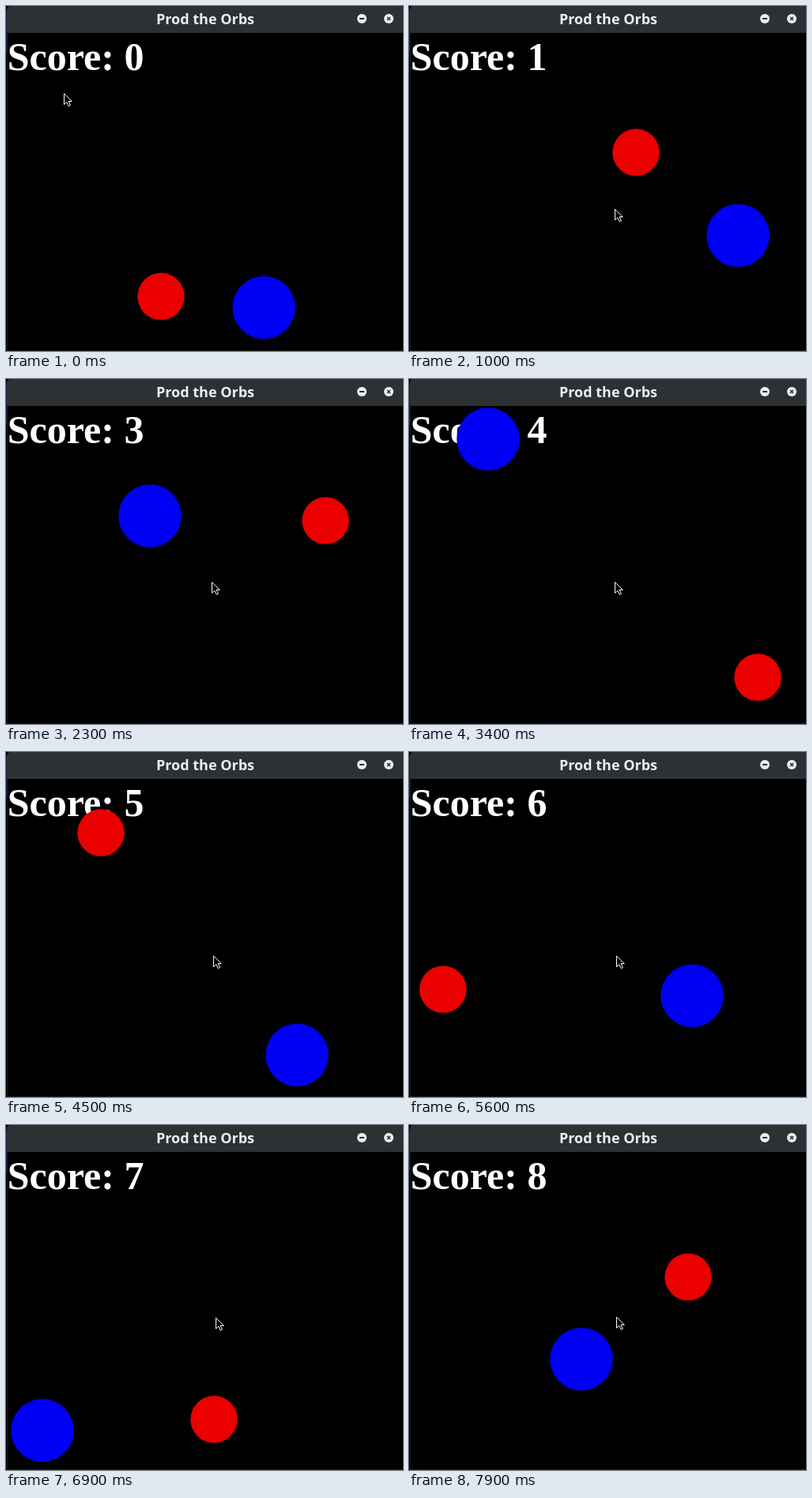
Write an HTML page with a canvas that moves like this. It is 502 px wide and 436 px high and loops after 8 s.

```html
<!DOCTYPE html>
<html lang="en">
<head>
<meta charset="utf-8">
<title>Dots game</title>
<style>
html, body { margin: 0; width: 100%; height: 100%; overflow: hidden; background: #000; }
canvas { display: block; }
</style>
</head>
<body>
<canvas id="stage" width="502" height="436"></canvas>
<script>
const ctx = document.getElementById('stage').getContext('2d');
const LOOP = 8000;
const FIELD = { left: 2, right: 502, top: 35, bottom: 435 };

// Each round holds dot positions and velocities at time `at`; a click starts the next round.
const rounds = [
  { from: 0, at: 0, red: [196, 367, 1, -2], blue: [326, 381, 2, -1] },
  { from: 4000, at: 5600, red: [43, 300, 1, 2], blue: [358, 308, -2, -1] },
  { from: 6850, at: 6900, red: [263, 372, 1, -2], blue: [46, 386, -2, -1] }
];

// time, x, y of the pointer tip
const pointerPath = [
  [50, 73, 110], [850, 260, 256], [3950, 260, 256], [4000, 262, 257],
  [6500, 262, 257], [6800, 265, 243], [7250, 265, 243], [7400, 262, 242]
];

const steps = t => Math.floor(t * 0.0901 + 0.9);

function bounce(p, low, high) {
  const span = high - low, period = 2 * span;
  const m = ((p - low) % period + period) % period;
  return low + (m > span ? period - m : m);
}

function disc(x, y, r, color) {
  ctx.fillStyle = color;
  ctx.beginPath();
  ctx.arc(x, y, r, 0, 2 * Math.PI);
  ctx.fill();
}

function line(x1, y1, x2, y2) {
  ctx.beginPath();
  ctx.moveTo(x1, y1);
  ctx.lineTo(x2, y2);
  ctx.stroke();
}

function drawDot([x, y, vx, vy], n, r, color) {
  disc(bounce(x + vx * n, FIELD.left + r, FIELD.right - r),
       bounce(y + vy * n, FIELD.top + r, FIELD.bottom - r), r - 0.3, color);
}

function drawWindow() {
  ctx.fillStyle = '#000';
  ctx.fillRect(0, 0, 502, 436);
  ctx.fillStyle = '#2d3134';
  ctx.beginPath();
  ctx.roundRect(1, 0, 501, 34, [5, 0, 0, 0]);
  ctx.fill();
  ctx.fillStyle = '#1c1c1e';
  ctx.fillRect(1, 34, 1, 402);
  ctx.fillRect(1, 435, 501, 1);
  ctx.fillStyle = '#181e4a';
  ctx.fillRect(0, 6, 1, 52);

  ctx.fillStyle = '#eee';
  ctx.font = 'bold 18px "Noto Sans", "Open Sans", sans-serif';
  ctx.textAlign = 'center';
  ctx.fillText('Prod the Orbs', 252, 23);

  disc(450, 16, 6, '#eee');
  disc(484, 16, 6, '#eee');
  ctx.strokeStyle = '#2d3134';
  ctx.lineWidth = 2;
  line(447, 16, 453, 16);
  ctx.lineWidth = 1.6;
  line(482, 14, 486, 18);
  line(486, 14, 482, 18);
}

function drawScore(t) {
  ctx.fillStyle = '#fff';
  ctx.font = 'bold 50px "Liberation Serif", "Times New Roman", serif';
  ctx.textAlign = 'left';
  ctx.fillText('Score: ' + Math.floor((t + 850) / 1000), 1.8, 80.5);
}

function pointerAt(t) {
  const i = pointerPath.findIndex(k => k[0] > t);
  if (i === 0) return pointerPath[0].slice(1);
  if (i < 0) return pointerPath.at(-1).slice(1);
  const [t0, x0, y0] = pointerPath[i - 1], [t1, x1, y1] = pointerPath[i];
  const u = (t - t0) / (t1 - t0), e = u * u * (3 - 2 * u);
  return [Math.round(x0 + (x1 - x0) * e), Math.round(y0 + (y1 - y0) * e)];
}

function drawPointer(t) {
  ctx.save();
  ctx.translate(...pointerAt(t));
  ctx.fillStyle = '#000';
  ctx.strokeStyle = '#fff';
  ctx.lineWidth = 1;
  const arrow = new Path2D('M.5 .8V14.5L3.8 11.4 6.2 16.5 8.4 15.5 6.1 10.5H10.3Z');
  ctx.fill(arrow);
  ctx.stroke(arrow);
  ctx.restore();
}

function draw(t) {
  const round = rounds.findLast(r => r.from <= t);
  const n = steps(t) - steps(round.at);
  drawWindow();
  drawScore(t);
  drawDot(round.red, n, 30, '#eb0000');
  drawDot(round.blue, n, 40, '#0000f4');
  drawPointer(t);
}

const start = performance.now();
function tick() {
  draw((performance.now() - start) % LOOP);
  requestAnimationFrame(tick);
}
tick();
</script>
</body>
</html>
```
